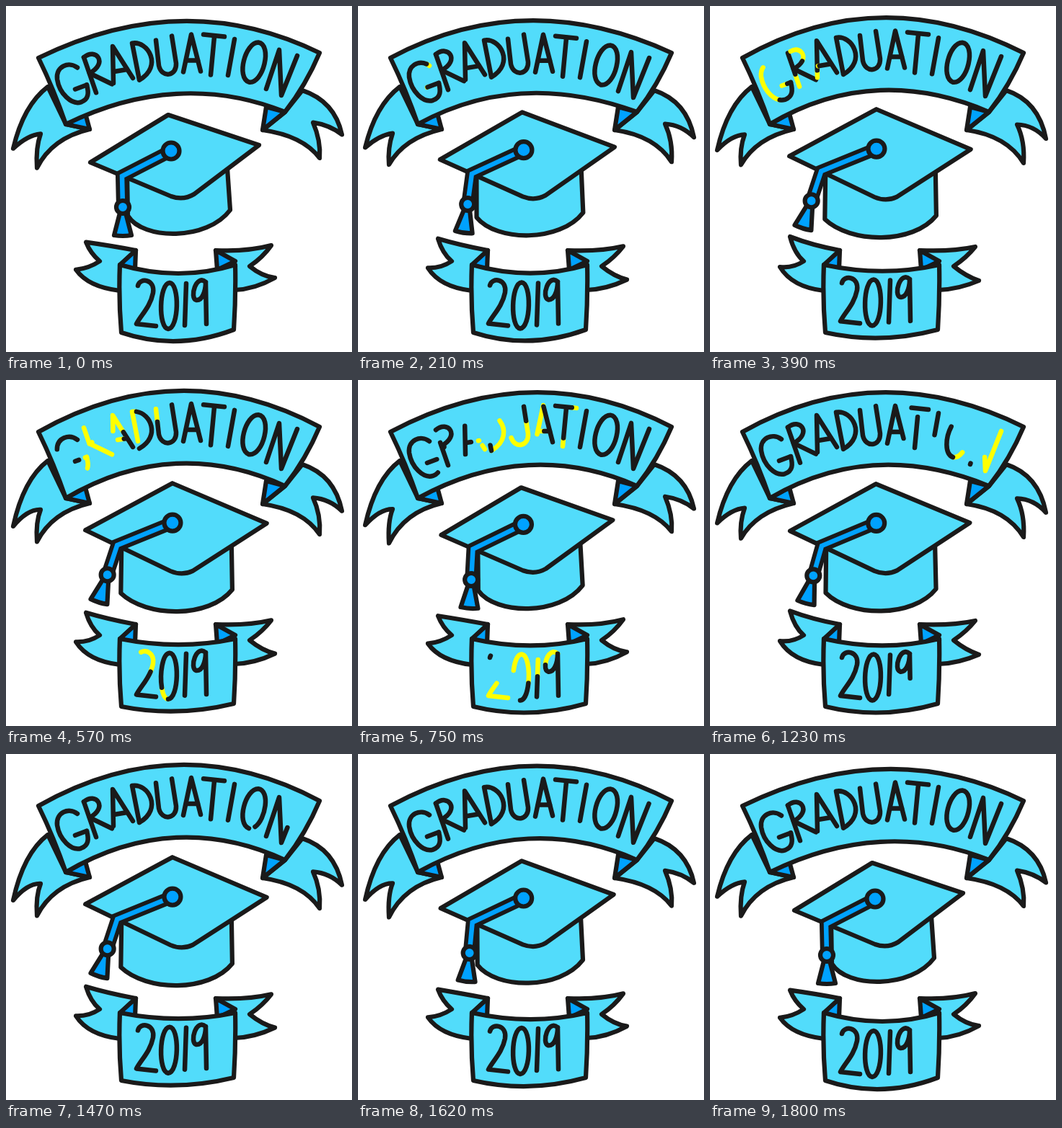
Write an HTML page that moves like this. It is 480 by 480 pixels and loops after 1830 ms.

```html
<!DOCTYPE html>
<html lang="en">
<head>
<meta charset="utf-8">
<title>Graduation 2019</title>
<style>
  html, body { margin: 0; width: 100%; height: 100%; overflow: hidden; background: #fff; }
  svg { display: block; width: 100vw; height: 100vh; }
  path, circle { stroke: #1a1a1a; stroke-width: 6.2; stroke-linecap: round; stroke-linejoin: round; }
  .light { fill: #52dcfb; }
  .dark { fill: #00a2ff; }
  .ink { fill: none; stroke-width: 6.5; }
  .glow { stroke: #ff0; }
  .cord { fill: none; stroke: #00a2ff; stroke-width: 6.5; stroke-linejoin: miter; }
  .cordEdge { fill: none; stroke-width: 18; stroke-linejoin: miter; }
</style>
</head>
<body>
<svg id="stage" viewBox="0 0 480 480" role="img" aria-label="Graduation 2019"></svg>
<script>
const LOOP = 1830, STEP = 30, SWAY = 900;
const stage = document.getElementById('stage');

function add(tag, cls, parent = stage) {
  const el = document.createElementNS('http://www.w3.org/2000/svg', tag);
  el.setAttribute('class', cls);
  return parent.appendChild(el);
}
const shape = cls => add('path', cls);
const draw = (el, d) => el.setAttribute('d', d);
const clamp = v => Math.max(0, Math.min(1, v));

// Smooth periodic curve through [time, value] keys
function curve(keys) {
  const n = keys.length;
  const at = i => {
    const k = ((i % n) + n) % n;
    return [keys[k][0] + (i - k) / n * SWAY, keys[k][1]];
  };
  const slope = i => (at(i + 1)[1] - at(i - 1)[1]) / (at(i + 1)[0] - at(i - 1)[0]);
  return time => {
    const t = ((time % SWAY) + SWAY) % SWAY;
    let i = n - 1;
    while (at(i)[0] > t) i--;
    const [t0, a] = at(i), [t1, b] = at(i + 1);
    const h = t1 - t0, u = (t - t0) / h, v = 1 - u;
    return a * v * v * (1 + 2 * u) + b * u * u * (3 - 2 * u)
      + slope(i) * h * u * v * v - slope(i + 1) * h * u * u * v;
  };
}
const swing = curve([[0, 0], [90, .067], [330, .85], [390, .97], [480, 1], [570, .97], [750, .22], [860, .01]]);
const bend = curve([[0, 0], [90, 2], [330, -4], [390, -5], [500, -6.2], [570, -6], [750, -4]]);
const wave = (t, peak, size) => size * Math.cos((t - peak) / SWAY * 2 * Math.PI);

// The ripple runs along the big banner from left to right
const ripple = (t, x) => bend(t + 240 - x);

// Back to front
const tailL = shape('light'), tailR = shape('light');
const foldL = shape('dark'), foldR = shape('dark');
const banner = shape('light');
const lowTailL = shape('light'), lowTailR = shape('light');
const lowFoldL = shape('dark'), lowFoldR = shape('dark');
const lowBanner = shape('light');
const base = shape('light'), board = shape('light');
const cordEdge = shape('cordEdge'), cord = shape('cord');
const skirt = shape('dark'), knot = add('circle', 'dark'), button = add('circle', 'dark');
draw(skirt, 'M-4 8L4 8L12 39Q0 41 -12 39Z');

function drawBanners(t) {
  const left = ripple(t, 175) * 4 / 3, right = ripple(t, 305) * 4 / 3, b = bend(t);
  const outL = 199.5 + wave(t, 600, 3.5), tipL = 223 + wave(t, 740, 3.5);
  const outR = 181 + wave(t, 380, 3), tipR = 214 + wave(t, 350, 4);
  draw(tailL, `M58 112Q24 138 10 ${outL}Q30 179 48 ${178 + (outL - 199) / 2}Q41 197 43 ${tipL}Q64 183 116 171L83 164Z`);
  draw(tailR, `M411 117Q456 132 466 ${outR}Q449 165 426 ${163 + (outR - 181) / 2}Q437 187 435 ${tipR}Q412 180 356 172L387 147Z`);
  draw(foldL, 'M83 164L110 149L116 171Z');
  draw(foldR, 'M361 140L387 147L356 172Z');
  draw(banner, `M45 72C175 ${6 + left} 305 ${4 + right} 435 65Q416 110 387 147`
    + `C289 ${110 + right} 185 ${111 + left} 83 164Q67 117 45 72Z`);

  const tip = 324 + wave(t, 840, 4), side = wave(t, 390, 2);
  draw(lowTailL, `M180 339Q142 332 111 ${tip}Q117 343 130 354Q115 364 97 ${364 - side}Q114 390 158 395L158 360Z`);
  draw(lowTailR, `M291 339Q335 341 368 ${333 + side / 2}Q356 349 338 361Q355 375 373 ${379 + side}Q345 393 317 394L318 360Z`);
  draw(lowFoldL, 'M180 339L179 366L158 359Z');
  draw(lowFoldR, 'M291 339L318 354L293 366Z');
  draw(lowBanner, `M158 359Q240 ${383 + 1.3 * b} 318 359Q319 403 316 449Q237 ${479 + 1.8 * b} 160 453Q156 406 158 359Z`);
}

function drawCap(v) {
  const mix = (a, b) => a + (b - a) * v;
  const p = (ax, ay, bx, by) => `${mix(ax, bx)} ${mix(ay, by)} `;
  draw(base, 'M' + p(168, 232, 160, 230) + 'L' + p(169, 291, 159, 296)
    + 'C' + p(190, 325, 195, 330) + p(279, 326, 282, 331) + p(311, 283, 314, 291)
    + 'L' + p(307, 225, 313, 228) + 'Z');
  draw(board, 'M' + p(117, 217, 110, 208) + 'L' + p(225, 151, 231, 143) + 'L' + p(351, 193, 362, 199)
    + 'L' + p(261, 261, 259, 265) + 'Q' + p(246, 270, 244, 272) + p(229, 264, 228, 265) + 'Z');
  const line = 'M' + p(229, 201, 231, 198) + 'L' + p(161, 236, 154, 229) + 'L' + p(162, 279, 140, 270);
  draw(cordEdge, line);
  draw(cord, line);
  const place = (el, pos) => el.setAttribute('transform', `translate(${pos})`);
  place(knot, p(162, 279, 140, 270));
  place(button, p(229, 201, 231, 198));
  knot.setAttribute('r', 9);
  button.setAttribute('r', 11.5);
  skirt.setAttribute('transform', `translate(${p(162, 279, 140, 270)}) rotate(${18 * v})`);
}

// Each glyph: centre x, then its pen strokes
const word = [
  [92, 'M99 85C87 76 69 83 71 101C74 121 91 137 104 133C115 129 115 120 112 109', 'M96 115L112 109'],
  [126, 'M125 119L108 70', 'M108 70C125 56 142 78 116 92L147 107'],
  [160, 'M149 105L148 54L176 98', 'M150 89L168 86'],
  [189, 'M185 101L175 50C197 46 218 82 185 101'],
  [222, 'M208 47L212 82C216 100 237 97 236 79L230 41'],
  [257, 'M246 92L257 40L270 91', 'M250 76L266 76'],
  [288, 'M303 44L274 41', 'M284 97L289 44'],
  [312, 'M317 48L308 98'],
  [345, 'M337 108C319 101 332 53 350 53C370 56 357 111 337 108'],
  [382, 'M361 117L379 63L382 126L404 71']
];
const year = [
  [195, 'M183 388C186 376 207 379 204 398C200 418 187 429 181 441L208 444'],
  [226, 'M225 448C211 447 212 385 227 384C241 385 240 447 225 448'],
  [249, 'M250 385L248 443'],
  [269, 'M277 383C264 371 254 405 264 408C272 409 277 396 277 383L278 441']
];

function makeGlyphs(list, start, gap, lift) {
  return list.map(([x, ...strokes], i) => {
    const group = add('g', '');
    const pens = strokes.map(d => ['ink glow', 'ink', 'ink'].map(cls => {
      const el = add('path', cls, group);
      el.setAttribute('pathLength', 1);
      draw(el, d);
      return el;
    }));
    return { group, pens, start: start + gap * i, lift: t => lift(t, x) };
  });
}
const glyphs = [
  ...makeGlyphs(word, 200, 82, (t, x) => 1.15 * ripple(t, x) * (1 - ((x - 240) / 195) ** 2)),
  ...makeGlyphs(year, 455, 78, (t, x) => bend(t) * (.9 - .5 * ((x - 238) / 80) ** 2))
];

function trim(el, from, to) {
  const size = to - from;
  el.style.visibility = size > 0 ? 'visible' : 'hidden';
  el.style.strokeDasharray = size >= 1 ? 'none' : `${Math.max(size, 0)} 3`;
  el.style.strokeDashoffset = -from;
}

// Old ink is wiped away, a yellow trail follows, then new ink slows to the end
function drawGlyphs(t) {
  for (const g of glyphs) {
    const age = t - g.start;
    const wipe = clamp(age / 270);
    const fade = clamp((age - 60) / 340) ** 1.5;
    const fresh = 1 - (1 - clamp((age - 290) / 420)) ** 1.85;
    g.group.setAttribute('transform', `translate(0 ${g.lift(t)})`);
    for (const [glow, old, ink] of g.pens) {
      trim(glow, fade, wipe);
      trim(old, wipe, 1);
      trim(ink, 0, fresh);
    }
  }
}

function render(now) {
  const t = Math.floor((now % LOOP) / STEP) * STEP;
  drawBanners(t);
  drawCap(swing(t));
  drawGlyphs(t);
}

const begin = performance.now();
function tick() {
  render(performance.now() - begin);
  requestAnimationFrame(tick);
}
tick();
</script>
</body>
</html>
```
